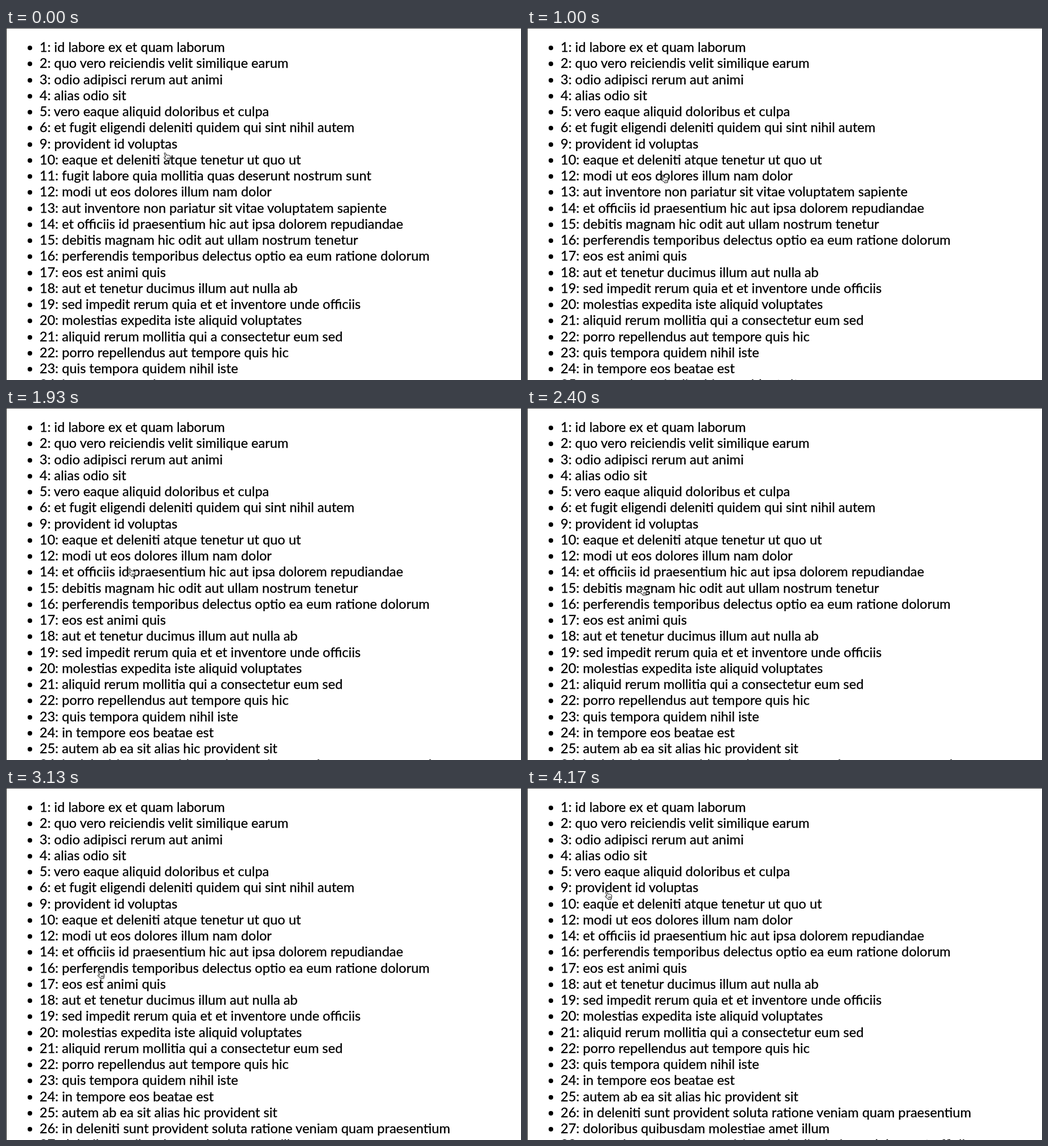
Recreate the animation shown at these times as an HTML page. Size 905 by 619 pixels, loop 4500 ms.

```html
<!DOCTYPE html>
<html lang="la">
<head>
<meta charset="utf-8">
<title>Removing list items</title>
<style>
  html, body { margin: 0; width: 100%; height: 100%; overflow: hidden; background: #fff; }
  .stage {
    position: relative; width: 905px; height: 619px; overflow: hidden; box-sizing: border-box;
    border-top: 1px solid #444; border-left: 1px solid #111;
  }
  ul {
    position: absolute; left: 0; top: 18px; margin: 0; padding: 0; list-style: none;
    font: 400 23.54px/28.25px Lato, sans-serif; color: #000; white-space: nowrap;
    -webkit-text-stroke: .3px #000;
  }
  li { position: relative; height: 28.25px; padding-left: 58px; }
  li::before {
    content: ""; position: absolute; left: 37px; top: 12px;
    width: 8px; height: 8px; border-radius: 50%; background: #000;
  }
  .gone { overflow: hidden; animation: 4500ms step-end infinite; }
  #n11 { animation-name: drop11; }
  #n13 { animation-name: drop13; }
  #n15 { animation-name: drop15; }
  #n6 { animation-name: drop6; }
  @keyframes drop11 { 22.222% { height: 0; } }
  @keyframes drop13 { 42.889% { height: 0; } }
  @keyframes drop15 { 61.556% { height: 0; } }
  @keyframes drop6 { 86.667% { height: 0; } }

  .hand {
    position: absolute; left: -1px; top: -1px; width: 14px; height: 16px;
    animation: wander 4500ms linear infinite;
  }
  @keyframes wander {
    0%, 0.6% { transform: translate(276px, 218px); }
    2.5% { transform: translate(282px, 220px); }
    4.5% { transform: translate(274px, 229px); }
    7.5% { transform: translate(252px, 246px); }
    10% { transform: translate(239px, 254px); }
    12%, 13%, 27% { transform: translate(235px, 257px); }
    29.5% { transform: translate(230px, 264px); }
    32.67% { transform: translate(223px, 269px); }
    35.5% { transform: translate(217px, 276px); }
    37.78%, 39% { transform: translate(215px, 280px); }
    39.33%, 48% { transform: translate(214px, 281px); }
    50.5% { transform: translate(205px, 300px); }
    53.33%, 63% { transform: translate(197px, 314px); }
    66% { transform: translate(185px, 322px); }
    69.55% { transform: translate(160px, 321px); }
    71% { transform: translate(145px, 266px); }
    73.33% { transform: translate(136px, 218px); }
    76.5% { transform: translate(135px, 194px); }
    81.55%, 100% { transform: translate(136px, 181px); }
  }
</style>
</head>
<body>
<div class="stage">
  <ul id="list"></ul>
  <svg class="hand" viewBox="0 0 14 16">
    <path d="M4.6 9.2 2.3 3.1C1.7 1.4 3.7.6 4.4 2.2L6.1 6.1C6.5 5 8 5 8.4 6 9.1 5.1 10.3 5.4 10.6 6.4 11.6 5.8 12.5 6.6 12.7 7.8 13.1 10.2 12.9 11.6 12.1 13L12.1 14.8 6.6 15.2 6.3 13.9 2 10.7C.8 9.6 2.2 8.2 3.4 8.8Z"
      fill="#fff" stroke="#000" stroke-width="1" stroke-linejoin="round"/>
    <path d="M7.6 10v3M9.3 9.8v3M11 9.7v3" fill="none" stroke="#000" stroke-width=".8"/>
  </svg>
</div>
<script>
  const items = `1: id labore ex et quam laborum
2: quo vero reiciendis velit similique earum
3: odio adipisci rerum aut animi
4: alias odio sit
5: vero eaque aliquid doloribus et culpa
6: et fugit eligendi deleniti quidem qui sint nihil autem
9: provident id voluptas
10: eaque et deleniti atque tenetur ut quo ut
11: fugit labore quia mollitia quas deserunt nostrum sunt
12: modi ut eos dolores illum nam dolor
13: aut inventore non pariatur sit vitae voluptatem sapiente
14: et officiis id praesentium hic aut ipsa dolorem repudiandae
15: debitis magnam hic odit aut ullam nostrum tenetur
16: perferendis temporibus delectus optio ea eum ratione dolorum
17: eos est animi quis
18: aut et tenetur ducimus illum aut nulla ab
19: sed impedit rerum quia et et inventore unde officiis
20: molestias expedita iste aliquid voluptates
21: aliquid rerum mollitia qui a consectetur eum sed
22: porro repellendus aut tempore quis hic
23: quis tempora quidem nihil iste
24: in tempore eos beatae est
25: autem ab ea sit alias hic provident sit
26: in deleniti sunt provident soluta ratione veniam quam praesentium
27: doloribus quibusdam molestiae amet illum
28: quo voluptates voluptas nisi veritatis dignissimos dolores ut officiis`.split("\n");
  const removed = [6, 11, 13, 15];
  const list = document.getElementById("list");
  for (const text of items) {
    const li = document.createElement("li");
    const id = parseInt(text, 10);
    li.textContent = text;
    if (removed.includes(id)) {
      li.id = "n" + id;
      li.className = "gone";
    }
    list.append(li);
  }
</script>
</body>
</html>
```
